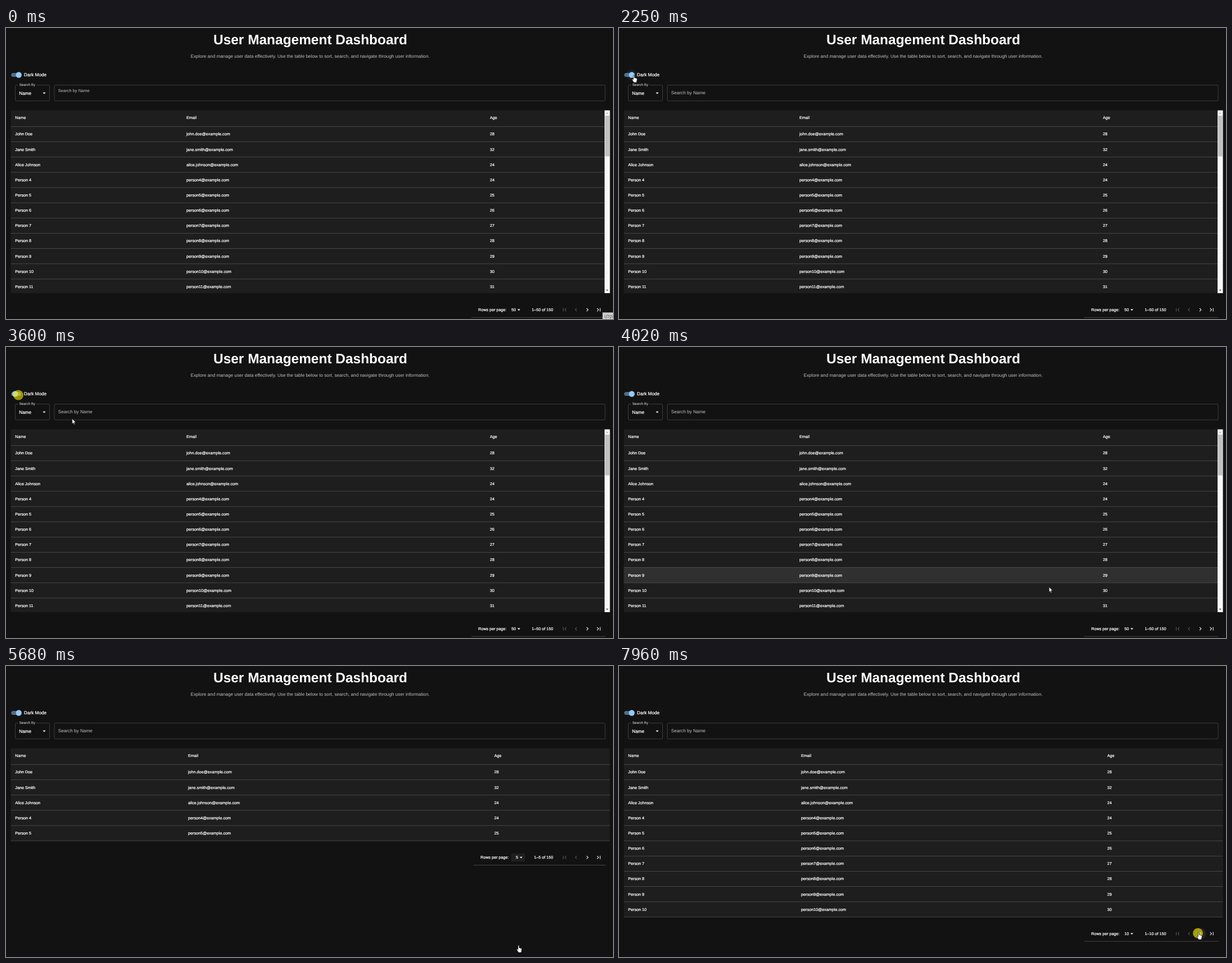
Animation, 1080 px wide and 518 px high, one loop 8 s. Source, as an HTML page:

```html
<!DOCTYPE html>
<html lang="en">
<head>
<meta charset="utf-8">
<title>User Management Dashboard</title>
<style>
  html, body { margin: 0; width: 100%; height: 100%; overflow: hidden; background: #121212; }
  svg { display: block; width: 100vw; height: 100vh; font-family: "Liberation Sans", Arial, sans-serif; text-rendering: geometricPrecision; }
</style>
</head>
<body>
<svg id="stage" viewBox="0 0 1080 518"></svg>
<script>
const LOOP = 8000, TOP = 175.4, PITCH = 27.15, ITEM = 18.5, SCALE = 0.513;

// moments of the clicks
const LIGHT_ON = 2350, DARK_ON = 3540, OPEN_1 = 5040, PICK_5 = 5420, OPEN_2 = 6720, PICK_10 = 7010, NEXT = 7910;
const CLICKS = [LIGHT_ON, DARK_ON, OPEN_1, PICK_5, OPEN_2, PICK_10, NEXT];

const DARK = { bg: '#121212', paper: '#1e1e1e', text: '#fff', sub: '#c2c2c2', line: '#515151', edge: '#4a4a4a', off: '#5a5a5a',
  drop: '#fff', hover: '#303030', track: '#516d85', thumb: '#90caf9', halo: '#90caf9', bar: '#f8f8f8', weight: 0.24 };
const LIGHT = { bg: '#fff', paper: '#fff', text: '#212121', sub: '#6c6c6c', line: '#e0e0e0', edge: '#c4c4c4', off: '#bdbdbd',
  drop: '#757575', hover: '#f5f5f5', track: '#9e9e9e', thumb: '#fff', halo: '#000', bar: '#f1f1f1', weight: 0 };

const CHEVRON = 'M-2.7-5.3 2.6 0-2.7 5.3', TO_END = 'M-5.7-5.3-.4 0-5.7 5.3M5-6V6';
const ARROW = 'M0 0V9.2L2 7.3 3.4 10.5 4.9 9.8 3.5 6.7H6.4Z';
const HAND = 'M-1 1a1 1 0 0 1 2 0V4.5L5 5.5 5.8 7 4.8 13H-.3L-3.4 7.5-2.4 6.8-1 7.8Z';

const NAMES = ['John Doe', 'Jane Smith', 'Alice Johnson'], AGES = [28, 32];
const OPTIONS = [5, 10, 20, 50];

// pointer stops: arrive, leave, x, y
const STOPS = [
  [920, 920, 330, 403], [1060, 1250, 250, 345], [1340, 1340, 179, 203], [1850, LIGHT_ON, 26.5, 84],
  [2600, DARK_ON, 23.5, 84], [4020, 4020, 765, 427], [4900, OPEN_1, 907, 499], [5300, PICK_5, 909, 441],
  [5620, 5720, 912, 497], [6500, OPEN_2, 908, 340], [6920, PICK_10, 908, 360], [7500, 7540, 907, 483],
  [7900, LOOP, 1031.5, 474]
];

const ramp = (t, a, b) => Math.min(1, Math.max(0, (t - a) / (b - a)));
const ease = k => k * k * (3 - 2 * k);
const mix = (a, b, k) => a + (b - a) * k;

function pointer(t) {
  const i = STOPS.findIndex(s => t <= s[1]);
  const [arrive, , x, y] = STOPS[i];
  if (!i) return null;
  const [, leave, x0, y0] = STOPS[i - 1], k = ramp(t, leave, arrive);
  return { x: mix(x0, x, k), y: mix(y0, y, k) };
}

const rect = (x, y, w, h, fill, extra = '') => `<rect x="${x}" y="${y}" width="${w}" height="${h}" fill="${fill}" ${extra}/>`;
const disc = (x, y, r, fill, alpha = 1) => `<circle cx="${x}" cy="${y}" r="${r}" fill="${fill}" fill-opacity="${alpha}"/>`;
const shape = (x, y, d, fill, extra = '') => `<path transform="translate(${x} ${y})" d="${d}" fill="${fill}" ${extra}/>`;
const drop = (x, y, fill) => shape(x, y, 'M-2.6-1H2.6L0 1.6Z', fill);
const frame = (x, w, color) => rect(x, 101.6, w, 28.2, 'none', `rx="2" stroke="${color}" stroke-width=".8"`);

function icon(x, y, d, color, flip) {
  const sx = flip ? -SCALE : SCALE;
  return `<path transform="translate(${x} ${y}) scale(${sx} ${SCALE})" d="${d}" fill="none" stroke="${color}" stroke-width="2"/>`;
}

// text centred vertically on its capitals
function label(x, y, str, size, fill, weight = 0, extra = '') {
  return `<text x="${x}" y="${y + size * 0.36}" font-size="${size}" fill="${fill}" stroke="${fill}" stroke-width="${weight}" ${extra}>${str}</text>`;
}

function header(t, c, over) {
  const on = 1 - ease(ramp(t, LIGHT_ON, LIGHT_ON + 150)) + ease(ramp(t, DARK_ON, DARK_ON + 150));
  const knob = mix(12.4, 22.7, on);
  const shrink = 0.34 * (1 - ease(ramp(t, 60, 200)));
  let s = label(541.5, 20, 'User Management Dashboard', 24.45, c.text, 0, 'font-weight="bold" text-anchor="middle"');
  s += label(328.5, 50, 'Explore and manage user data effectively. Use the table below to sort, search, and navigate through user information.', 8.2, c.sub);
  s += rect(9.2, 79.9, 17.4, 7.2, c.track, 'rx="3.6"');
  if (over) s += disc(knob, 83.5, 9.75, c.halo, 0.08);
  if (c === LIGHT) s += disc(knob, 84.1, 5.4, '#000', 0.2);
  s += disc(knob, 83.5, 5.15, c.thumb);
  s += label(32, 83, 'Dark Mode', 8.2, c.text, c.weight);
  s += frame(16.5, 61, c.edge) + rect(21.5, 100, 32.5, 3, c.bg) + label(23.7, 101.2, 'Search By', 6.15, c.sub, c.weight / 2);
  s += label(23.3, 116, 'Name', 8.2, c.text, c.weight) + drop(68, 115.8, c.drop);
  s += frame(86, 980, c.edge);
  return s + label(92.8, 115.4 - 12.8 * shrink, 'Search by Name', 8.2 * (1 - shrink / 4), c.sub);
}

function table(c, n, bottom, hover) {
  const long = n === 50, right = long ? 1065 : 1074.5;
  const cols = long ? [16.3, 321, 861] : [16.3, 324, 868.7];
  const row = (y, cells) => cells.map((v, i) => label(cols[i], y, v, 7.2, c.text, c.weight)).join('');
  const rule = y => rect(8.5, y - 0.4, right - 8.5, 0.8, c.line);
  const height = bottom - 146.6;
  let s = '';
  if (c === LIGHT) s += rect(8.2, 147.2, 1066.6, height, '#b4b4b4', 'rx="2"');
  s += rect(8.5, 146.6, 1066, height, c.paper, 'rx="2"');
  s += row(159.8, ['Name', 'Email', 'Age']) + rule(TOP);
  for (let i = 0; i < Math.min(n, 11); i++) {
    const y = TOP + i * PITCH, end = Math.min(y + PITCH, bottom);
    const name = NAMES[i] || 'Person ' + (i + 1);
    const user = NAMES[i] ? name.toLowerCase().replace(' ', '.') : 'person' + (i + 1);
    const age = AGES[i] || Math.max(24, 21 + i);
    if (i === hover) s += rect(8.5, y, right - 8.5, end - y, c.hover) + rule(y);
    s += row(y + 13.4, [name, user + '@example.com', age]);
    if (y + PITCH <= bottom) s += rule(y + PITCH);
  }
  if (long) {
    s += rect(1065, 146.6, 9.5, 325.4, c.bar) + rect(1065.7, 156, 8, 72.5, '#c1c1c1');
    s += shape(1069.7, 150.4, 'M0 0l2 2.4h-4z', '#a3a3a3') + shape(1069.7, 468.2, 'M0 0l2-2.4h-4z', '#505050');
  }
  return s;
}

function pager(t, c, n, y) {
  const shift = n === 5 ? 4 : 0, left = 828 + shift, tip = 912.5 + shift;
  const put = (x, str, anchor = 'start') => label(x, y, str, 7.2, c.text, c.weight, `text-anchor="${anchor}"`);
  let s = rect(left, y + 13.2, 1066.5 - left, 0.8, c.line);
  if (t > OPEN_1 && t < NEXT) s += rect(tip - 17.5, y - 7.2, 24.5, 14.5, '#1f1f1f', 'rx="1.5"');
  s += put(left + 12.2, 'Rows per page:') + put(tip - 5.3, n, 'end') + put(973.4, `1–${n} of 150`, 'end');
  s += drop(tip, y, c.drop);
  if (t > NEXT - 50) s += disc(1034, y, 10.3, '#fff', 0.08);
  [TO_END, CHEVRON, CHEVRON, TO_END].forEach((d, i) => s += icon(994 + 20.2 * i, y, d, i < 2 ? c.off : c.text, i < 2));
  return s;
}

function menu(top, picked, alpha) {
  if (!alpha) return '';
  let s = `<g opacity="${alpha}">` + rect(891, top, 40, 8.2 + ITEM * OPTIONS.length, '#2e2e2e', 'rx="2"');
  OPTIONS.forEach((v, i) => {
    const y = top + 4.1 + ITEM * i;
    if (v === picked) s += rect(891, y, 40, ITEM, '#3d4750');
    s += label(899.2, y + ITEM / 2, v, 8.2, '#fff');
  });
  return s + '</g>';
}

function cursor(t, p, hand) {
  const click = CLICKS.find(k => t >= k && t < k + 250);
  let s = '';
  if (click) {
    const spot = pointer(click);
    s += disc(spot.x - 1.5, spot.y + 1.6, 9, '#ffee00', mix(0.72, 0.15, ramp(t, click, click + 250)));
  }
  return s + shape(p.x, p.y, hand ? HAND : ARROW, '#fff', 'stroke="#111" stroke-width=".7" stroke-linejoin="round"');
}

function scene(t) {
  const c = t >= LIGHT_ON && t < DARK_ON ? LIGHT : DARK;
  const n = t < PICK_5 ? 50 : t < PICK_10 ? 5 : 10;
  const bottom = n === 50 ? 472 : TOP + n * PITCH;
  const p = pointer(t), late = pointer(t - 30);
  const fade = (open, pick) => ramp(t, open, open + 150) * (1 - ramp(t, pick, pick + 130));
  const menu1 = fade(OPEN_1, PICK_5), menu2 = fade(OPEN_2, PICK_10);
  // row highlight trails the pointer slightly
  const free = late && !menu1 && !menu2 && late.y < bottom && late.y > TOP;
  const hover = free ? Math.floor((late.y - TOP) / PITCH) : -1;
  const over = p && p.x < 34 && p.y < 96;

  let s = rect(0, 0, 1080, 518, c.bg) + header(t, c, over) + table(c, n, bottom, hover) + pager(t, c, n, bottom + 29.6);
  s += menu(427.6, 50, menu1) + menu(327.6, 5, menu2);
  if (t < 70) {
    s += rect(1061.5, 506.5, 20, 13, '#cfcfcf', 'stroke="#8a8a8a" stroke-width=".6"');
    s += label(1064.5, 513.6, 'הקלט', 8, '#555');
  }
  return p ? s + cursor(t, p, hover < 0 && (over || p.x > 890)) : s;
}

const stage = document.getElementById('stage');
let shown = '';
function tick(now) {
  const next = scene(now % LOOP);
  if (next !== shown) stage.innerHTML = shown = next;
  requestAnimationFrame(tick);
}
tick(0);
</script>
</body>
</html>
```
